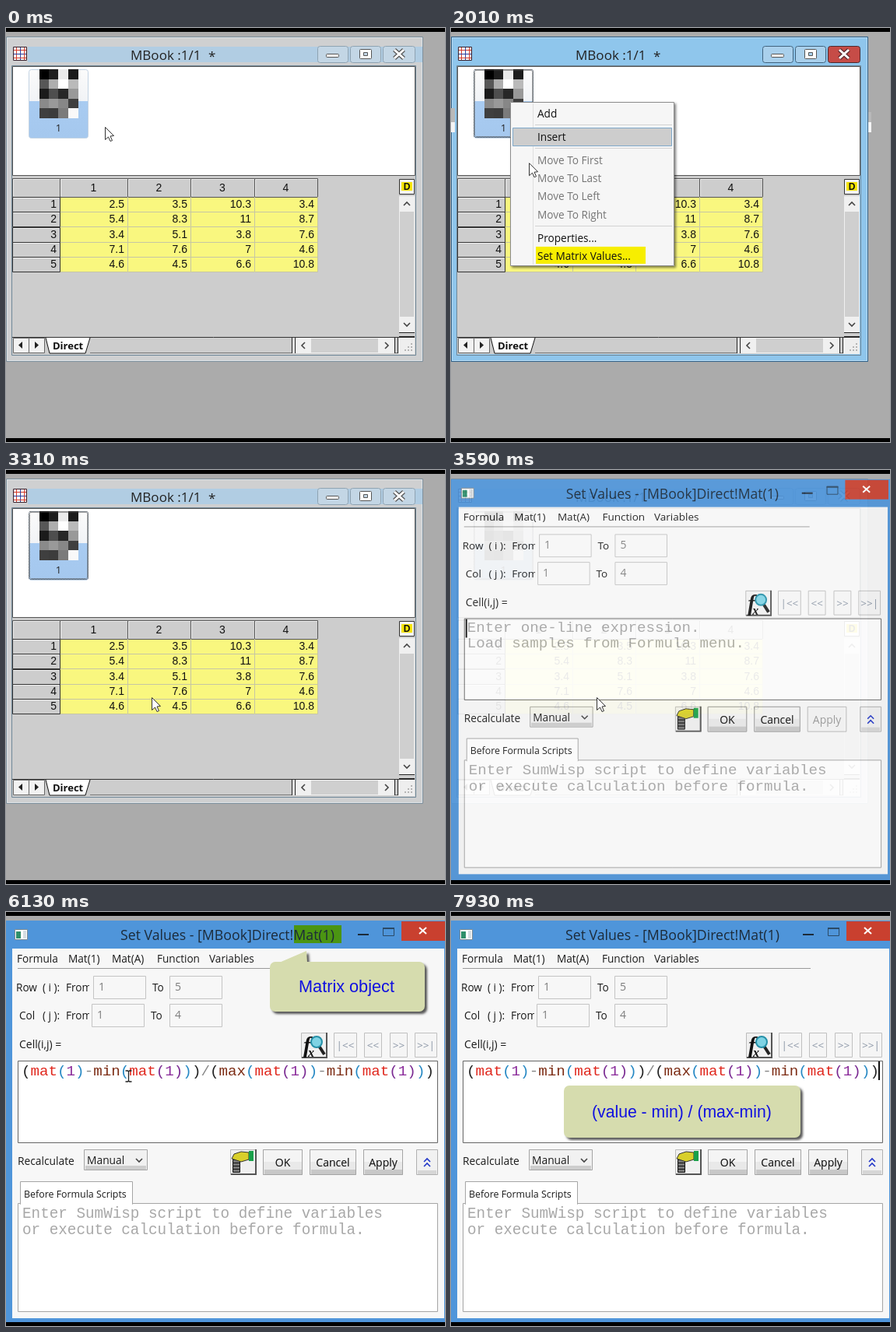
These frames come from a looping animation (564 px wide and 532 px high, 8 s). An HTML page with a canvas:

```html
<!DOCTYPE html>
<html lang="en">
<head>
<meta charset="utf-8">
<title>Set matrix values</title>
<style>
html, body { margin: 0; width: 100%; height: 100%; overflow: hidden; background: #ababab; }
canvas { display: block; }
</style>
</head>
<body>
<canvas id="stage" width="564" height="532"></canvas>
<script>
const stage = document.getElementById('stage');
const layer = stage.cloneNode();
let ctx = stage.getContext('2d');
const LOOP = 8000;
const UI = '"Open Sans", "Noto Sans", sans-serif';
const ARIAL = '"Liberation Sans", Arial, sans-serif';
const SERIF = '"Liberation Serif", serif';
const MONO = '"Liberation Mono", "Courier New", monospace';
const VALUES = [
  [2.5, 3.5, 10.3, 3.4], [5.4, 8.3, 11, 8.7], [3.4, 5.1, 3.8, 7.6],
  [7.1, 7.6, 7, 4.6], [4.6, 4.5, 6.6, 10.8]
];
const COLS = [8, 69, 156, 237, 319, 400];
const MENU = [
  ['Add', 110], ['Insert', 140], ['Move To First', 170, 1], ['Move To Last', 193, 1],
  ['Move To Left', 216, 1], ['Move To Right', 240, 1], ['Properties...', 270], ['Set Matrix Values...', 293]
];
// time, x, y of the pointer
const PATH = [
  [0, 127, 127], [30, 127, 127], [31, 125, 127], [460, 125, 127], [730, 76, 95], [1620, 76, 95],
  [2010, 100, 173], [2400, 112, 262], [2430, 112, 262], [2910, 187, 292], [3910, 187, 292],
  [4250, 157, 211], [7810, 157, 211], [7930, 186, 211]
];

const ramp = (t, a, b) => Math.min(1, Math.max(0, (t - a) / (b - a)));

function pointer(t) {
  let i = 1;
  while (i < PATH.length - 1 && t > PATH[i][0]) i++;
  const [t0, x0, y0] = PATH[i - 1], [t1, x1, y1] = PATH[i], p = ramp(t, t0, t1);
  return [x0 + (x1 - x0) * p, y0 + (y1 - y0) * p];
}

// Fades every stroke on its own
function faded(alpha, draw) {
  if (alpha <= 0) return;
  ctx.save();
  ctx.globalAlpha *= alpha;
  draw();
  ctx.restore();
}

// Fades a whole drawing as one picture
function group(alpha, draw) {
  if (alpha <= 0) return;
  const main = ctx;
  ctx = layer.getContext('2d');
  ctx.clearRect(0, 0, 564, 532);
  ctx.save();
  draw();
  ctx.restore();
  ctx = main;
  faded(alpha, () => ctx.drawImage(layer, 0, 0));
}

function rect(x, y, w, h, fill) {
  ctx.fillStyle = fill;
  ctx.fillRect(x, y, w, h);
}

function box(x, y, w, h, fill, stroke, r = 0) {
  ctx.beginPath();
  ctx.roundRect(x + .5, y + .5, w - 1, h - 1, r);
  if (fill) { ctx.fillStyle = fill; ctx.fill(); }
  if (stroke) { ctx.strokeStyle = stroke; ctx.lineWidth = 1; ctx.stroke(); }
}

function line(points, color, width = 1) {
  ctx.beginPath();
  for (let i = 0; i < points.length; i += 2) ctx.lineTo(points[i], points[i + 1]);
  ctx.strokeStyle = color;
  ctx.lineWidth = width;
  ctx.stroke();
}

function shape(points, fill, stroke) {
  ctx.beginPath();
  for (let i = 0; i < points.length; i += 2) ctx.lineTo(points[i], points[i + 1]);
  ctx.closePath();
  ctx.fillStyle = fill;
  ctx.fill();
  if (stroke) { ctx.strokeStyle = stroke; ctx.lineWidth = 1; ctx.stroke(); }
}

function text(s, x, y, size, color = '#1a1a1a', font = UI, align = 'left', weight = '') {
  ctx.font = `${weight} ${size}px ${font}`;
  ctx.textAlign = align;
  ctx.fillStyle = color;
  ctx.fillText(s, x, y);
}

// A small angle mark pointing along dx, dy
function chevron(x, y, dx, dy, color = '#444', s = 4) {
  line([x - dx * s / 2 - dy * s, y - dy * s / 2 - dx * s, x + dx * s / 2, y + dy * s / 2,
    x - dx * s / 2 + dy * s, y - dy * s / 2 + dx * s], color, 1.6);
}

function frame(active) {
  box(0, 11, 536, 418, active ? '#8fc6ec' : '#cfd0d1', active ? '#2f5f86' : '#7d8f9b');
  box(1, 12, 534, 416, null, active ? '#b9dcf4' : '#dde3e7');
  if (active) {
    rect(0, 103, 5, 18, '#b9b9b9');
    rect(0, 121, 5, 13, '#f4f4f4');
    rect(536, 108, 4, 13, '#b9b9b9');
    rect(536, 121, 4, 13, '#f4f4f4');
  } else rect(28, 24, 507, 20, '#b1cde3');
  const face = active ? '#a9d0ec' : '#c3d6e5', edge = active ? '#41637e' : '#8fa3b2';
  box(400, 23, 40, 22, face, edge, 3);
  box(442, 23, 40, 22, face, edge, 3);
  box(484, 23, 42, 22, active ? '#c64c47' : face, active ? '#4d2a30' : edge, 3);
  box(411, 33, 17, 5, '#fff', '#555', 1);
  box(454, 27, 16, 13, '#fff', '#555', 1);
  box(459, 31, 6, 5, face, '#555');
  for (const [c, w] of [[active ? '#5c2a30' : '#555', 5.5], ['#fff', 3]]) {
    line([499, 28, 511, 39], c, w);
    line([511, 28, 499, 39], c, w);
  }
}

function thumbnail(focus) {
  const g = ctx.createLinearGradient(0, 53, 0, 141);
  g.addColorStop(0, '#fbfbfb');
  g.addColorStop(.46, '#f1f3f6');
  g.addColorStop(.47, '#a8cbf1');
  g.addColorStop(1, '#a5c8ee');
  box(29, 53, 77, 89, g, '#c3d3e3', 3);
  VALUES.forEach((row, r) => row.forEach((v, c) => {
    const k = Math.round((v - 2.5) / 8.5 * 255);
    const x = Math.round(42.5 + c * 12.4), y = Math.round(53 + r * 12.5);
    rect(x, y, 13, 13, `rgb(${k},${k},${k})`);
  }));
  text('1', 67.5, 133, 13, '#222', UI, 'center');
  faded(focus, () => {
    ctx.setLineDash([1, 1]);
    box(29, 53, 77, 88, null, '#222', 2);
    box(30, 54, 75, 86, null, '#555', 2);
    ctx.setLineDash([]);
  });
}

function sheet() {
  rect(8, 190, 517, 229, '#cdcdcd');
  rect(69, 217, 331, 97, '#f9f77f');
  for (let c = 0; c < 5; c++) {
    const x = COLS[c], w = COLS[c + 1] - x;
    box(x, 193, w + 1, 25, '#cdcdcd', '#555');
    line([x + 1.5, 216, x + 1.5, 194.5, x + w, 194.5], '#eee');
    if (c) text(c, x + w / 2, 210, 14, '#111', ARIAL, 'center');
  }
  VALUES.forEach((row, r) => {
    const y = 217 + Math.round(r * 19.3);
    box(8, y, 62, 20, '#cdcdcd', '#333');
    line([9.5, y + 1.5, 68, y + 1.5], '#eee');
    text(r + 1, 65, y + 14, 14, '#111', ARIAL, 'right');
    row.forEach((v, c) => {
      const x = COLS[c + 1], w = COLS[c + 2] - x;
      line([x + 1, y + 19.5, x + w + .5, y + 19.5, x + w + .5, y], '#c6c6a4');
      text(v, x + w - 4, y + 14, 14, '#111', ARIAL, 'right');
    });
  });
}

function scrollbars() {
  box(505, 194, 20, 20, '#f4f4f4', '#333');
  rect(508, 198, 14, 11, '#f5e400');
  text('D', 515, 208, 12, '#111', ARIAL, 'center', 'bold');
  rect(505, 216, 20, 175, '#f0f0f0');
  rect(506, 236, 18, 135, '#cfcfcf');
  chevron(515, 226, 0, -1);
  chevron(515, 381, 0, 1);
  rect(505, 391, 20, 1, '#222');
  rect(505, 396, 20, 1, '#222');
  line([8, 397.5, 525, 397.5], '#333');
  box(9, 398, 21, 20, '#f2f2f2', '#666');
  box(29, 398, 21, 20, '#f2f2f2', '#666');
  shape([21, 403, 21, 412, 16, 407.5], '#222');
  shape([37, 403, 37, 412, 42, 407.5], '#222');
  shape([51, 398, 56, 418, 102, 418, 108, 398], '#fff');
  line([51, 398, 56, 418, 102, 418, 108, 398], '#111');
  text('Direct', 60, 413, 13, '#111', UI, 'left', 'bold');
  line([108, 417.5, 525, 417.5], '#777');
  rect(368, 398, 132, 20, '#f0f0f0');
  rect(392, 399, 86, 18, '#cfcfcf');
  for (const x of [367, 371, 499, 503]) rect(x, 398, 1, 20, '#222');
  chevron(382, 408, -1, 0);
  chevron(489, 408, 1, 0);
  rect(504, 398, 21, 21, '#eee');
  for (let r = 0; r < 3; r++)
    for (let c = r; c < 3; c++) rect(512 + c * 4, 413 - r * 4, 2, 2, '#b5b5b5');
}

function bookWindow(t) {
  frame(false);
  if (t < 3310) faded(ramp(t, 460, 730), () => frame(true));
  box(9, 24, 18, 18, '#fff', '#3a2430');
  for (let i = 0; i < 3; i++) {
    rect(10, 28 + i * 5, 16, 1, i % 2 ? '#2b3f9e' : '#d23a2a');
    rect(13 + i * 5, 25, 1, 16, i % 2 ? '#2b3f9e' : '#d23a2a');
  }
  text('MBook :1/1', 160, 41, 17, '#222');
  text('*', 260, 42, 17, '#222');
  box(7, 48, 520, 373, null, '#6f8798');
  box(8, 49, 518, 141, '#fff', '#555');
  thumbnail(ramp(t, 1060, 1200));
  sheet();
  scrollbars();
}

function contextMenu(t) {
  ctx.save();
  ctx.shadowColor = 'rgba(0,0,0,.5)';
  ctx.shadowBlur = 3;
  ctx.shadowOffsetX = ctx.shadowOffsetY = 2;
  rect(76, 95, 211, 211, '#f6f6f6');
  ctx.restore();
  box(76, 95, 211, 211, '#f6f6f6', '#8c8c8c');
  rect(105, 97, 1, 207, '#dedede');
  for (const y of [124, 154, 254]) rect(108, y, 176, 1, '#d2d2d2');
  const y = pointer(t - 150)[1];
  if (t > 1620) for (const [, mid, off] of MENU)
    if (!off && Math.abs(y - mid) < 12) box(79, mid - 12, 205, 24, '#cdcdcd', '#7fa9cb');
  if (t >= 1460) rect(109, 281, 141, 22, '#f7ee00');
  for (const [label, mid, off] of MENU) text(label, 111, mid + 5, 13.6, off ? '#757575' : '#111');
}

function button(x, w, label, on = 1) {
  box(x, 305, w, 33, '#f4f4f4', '#b9b9b9');
  faded(on, () => {
    rect(x + 1, 321, w - 2, 16, '#e9e9e9');
    rect(x + 2, 331, w - 3, 6, '#c8c8c8');
    box(x, 305, w, 33, null, '#a5a5a5');
  });
  text(label, x + w / 2, 327, 14, '#989898', UI, 'center');
  faded(on, () => text(label, x + w / 2, 327, 14, '#1a1a1a', UI, 'center'));
}

function raised(x, y) {
  box(x, y, 34, 33, '#f0f0f0', '#bbb');
  line([x + 1, y + 32, x + 33, y + 32, x + 33, y], '#555', 2);
}

function field(x, y, value) {
  box(x, y, 68, 30, '#f7f7f7', '#c4c4c4');
  text(value, x + 7, y + 19, 14, '#7d7d7d');
}

function formula() {
  const s = '(mat(1)-min(mat(1)))/(max(mat(1))-min(mat(1)))';
  const parens = ['#222', '#2588c4', '#7a2a92'];
  let depth = 0, x = 20;
  for (const part of s.match(/[a-z]+|./g)) {
    let color = { mat: '#e0281e', min: '#7c2c14', max: '#7c2c14', 1: '#8a2a9a' }[part] || '#888';
    if (part === '(') color = parens[depth++];
    if (part === ')') color = parens[--depth];
    text(part, x, 210, 19.2, color, MONO);
    x += part.length * 11.52;
  }
}

function dialog(t) {
  // The window reaches past the stage, so no gap opens while it grows
  rect(-8, 11, 588, 530, '#4f95da');
  rect(8, 47, 555, 475, '#f7f7f7');
  box(11, 22, 17, 14, '#fff', '#7a8a94');
  rect(13, 25, 6, 9, '#2f8f6a');
  rect(22, 24, 4, 10, '#d5dde2');
  faded(ramp(t, 4100, 4690) * (1 - ramp(t, 6620, 7220)), () => rect(370, 17, 61, 23, '#4b9512'));
  text('Set Values - [MBook]Direct!Mat(1)', 147, 36, 17.7, '#1c2b3a');
  rect(452, 28, 14, 2, '#1c2b3a');
  box(484, 20, 15, 11, null, '#2b4a66');
  rect(484, 20, 15, 2, '#2b4a66');
  rect(508, 12, 56, 25, '#c9402f');
  line([531, 20, 540, 28], '#fff', 2);
  line([540, 20, 531, 28], '#fff', 2);

  [['Formula', 14], ['Mat(1)', 80], ['Mat(A)', 136], ['Function', 194], ['Variables', 261]]
    .forEach(([s, x]) => text(s, x, 65, 13.6));
  rect(15, 72, 447, 1, '#9a9a9a');
  [['Row', 'i', 82, 5, 13, 112, 188], ['Col', 'j', 118, 4, 17, 110, 186]].forEach(([name, v, y, n, x, from, to]) => {
    text(name, x, y + 20, 13.6);
    text(`( ${v} ):`, 47, y + 20, 13.6);
    ctx.save();
    ctx.beginPath();
    ctx.rect(76, y, 31, 30);
    ctx.clip();
    text('From', 77, y + 20, 13.6);
    ctx.restore();
    field(from, y, 1);
    text('To', to, y + 20, 13.6);
    field(210, y, n);
  });
  text('Cell(i,j) =', 17, 175, 14);

  raised(379, 155);
  text('f', 382, 181, 29, '#111', SERIF, 'left', 'italic bold');
  text('x', 388, 186, 16, '#111', SERIF, 'left', 'italic bold');
  line([402, 172, 409, 183], '#222', 4);
  ctx.beginPath();
  ctx.arc(399, 167, 7, 0, 7);
  ctx.fillStyle = '#7fd3e4';
  ctx.fill();
  ctx.strokeStyle = '#2590a8';
  ctx.lineWidth = 2;
  ctx.stroke();
  [['|<<', 421, 30], ['<<', 460, 23], ['>>', 493, 23], ['>>|', 525, 29]].forEach(([s, x, w]) => {
    box(x, 155, w, 32, '#f5f5f5', '#c0c0c0');
    text(s, x + w / 2, 176, 13.5, '#8b96a6', UI, 'center');
  });

  box(15, 191, 540, 106, '#fff', '#666');
  const typed = t >= 5600;
  if (typed) formula();
  else {
    text('Enter one-line expression.', 19, 208, 19.3, '#a8a8a8', MONO);
    text('Load samples from Formula menu.', 19, 229, 19.3, '#a8a8a8', MONO);
  }
  const off = [[4000, 4500], [5000, 5500], [6000, 6500], [7000, 7400]].some(([a, b]) => t >= a && t < b);
  if (!off) rect(typed ? 549 : 17, 192, 2, 24, '#111');

  text('Recalculate', 15, 325, 13.8);
  box(100, 305, 82, 27, '#f1f1f1', '#a5a5a5');
  rect(102, 326, 78, 5, '#cdcdcd');
  text('Manual', 104, 324, 13.8);
  chevron(171, 319, 0, 1);
  raised(288, 305);
  for (let i = 0; i < 4; i++) box(291, 318 + i * 4, 10, 5, '#777', '#111');
  shape([290, 317, 293, 311, 302, 308, 312, 309, 312, 318, 302, 321], '#d8cf2a', '#333');
  rect(312, 307, 6, 13, '#18a04a');
  button(330, 51, 'OK');
  button(390, 60, 'Cancel');
  button(459, 51, 'Apply', ramp(t, 5800, 6100));
  box(527, 305, 28, 33, '#f1f1f1', '#b0b0b0');
  rect(529, 332, 24, 5, '#d6d6d6');
  chevron(541, 319, 0, -1, '#2136c8');
  chevron(541, 325, 0, -1, '#2136c8');

  box(15, 374, 540, 140, '#fff', '#a5a5a5');
  box(18, 346, 145, 30, '#fff', '#a5a5a5');
  rect(19, 373, 143, 4, '#fff');
  text('Before Formula Scripts', 23, 367, 12.4);
  text('Enter SumWisp script to define variables', 21, 393, 19.3, '#a8a8a8', MONO);
  text('or execute calculation before formula.', 21, 414, 19.3, '#a8a8a8', MONO);
}

function callout(x, y, w, h, label, lx, size, tip) {
  ctx.save();
  ctx.shadowColor = 'rgba(0,0,0,.65)';
  ctx.shadowBlur = 3;
  ctx.shadowOffsetX = ctx.shadowOffsetY = 3;
  ctx.beginPath();
  ctx.roundRect(x, y, w, h, 7);
  if (tip) {
    ctx.moveTo(x + 12, y + 1);
    ctx.lineTo(x + 47, y - 14);
    ctx.lineTo(x + 48, y + 1);
  }
  ctx.fillStyle = '#d6dcae';
  ctx.fill();
  ctx.restore();
  text(label, lx, y + h / 2 + 7, size, '#1010e0', ARIAL);
}

function arrow(x, y) {
  shape([x, y, x, y + 16, x + 4, y + 12.5, x + 6.5, y + 18, x + 9, y + 17, x + 6.5, y + 11.5, x + 11, y + 11],
    '#fff', '#333');
}

function beam(x, y) {
  for (const d of [-1, 1])
    line([x - 4, y + 7 * d, x - 1, y + 7 * d, x, y + 6 * d, x + 1, y + 7 * d, x + 4, y + 7 * d], '#222', 1.3);
  line([x, y - 6, x, y + 6], '#222', 1.3);
}

function render(t) {
  rect(0, 0, 564, 532, '#ababab');
  if (t < 3710) bookWindow(t);
  if (t < 3310) group(ramp(t, 1060, 1300), () => contextMenu(t));
  if (t >= 3440) {
    const rest = (1 - ramp(t, 3440, 3710)) ** 3, s = 1 - .08 * rest;
    group(1 - rest, () => {
      ctx.translate(272 * (1 - s), 136 * (1 - s));
      ctx.scale(s, s);
      dialog(t);
    });
  }
  faded(ramp(t, 4100, 4690) * (1 - ramp(t, 6620, 7220)),
    () => callout(339, 64, 199, 64, 'Matrix object', 376, 21.7, true));
  faded(ramp(t, 7100, 7550),
    () => callout(145, 223, 304, 67, '(value - min) / (max-min)', 181, 21.2));
  if (t >= 3440) rect(0, 5, 564, 6, '#ababab');
  rect(0, 0, 564, 5, '#000');
  rect(0, 527, 564, 5, '#000');
  const [x, y] = pointer(t);
  if (t < 3910) arrow(x + .5, y + .5);
  else if (t < 7930) beam(x + .5, y);
}

function tick() {
  render(performance.now() % LOOP);
  requestAnimationFrame(tick);
}
tick();
</script>
</body>
</html>
```
